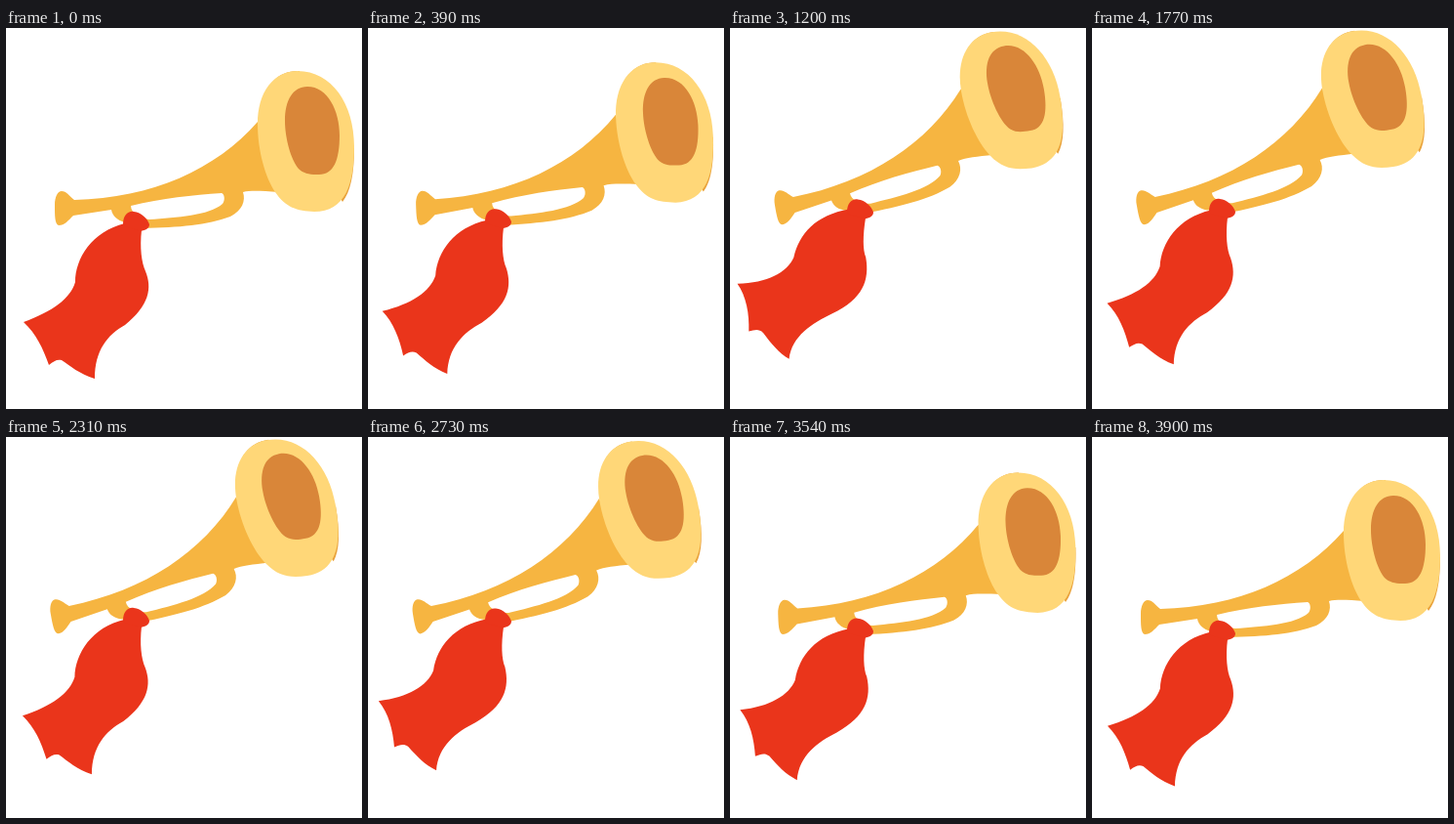
Animation, 365 px wide and 390 px high, one loop 3930 ms. Source, as an HTML page:

```html
<!DOCTYPE html>
<html lang="en">
<head>
<meta charset="utf-8">
<title>Bugle</title>
<style>
  html, body { margin: 0; width: 100%; height: 100%; overflow: hidden; background: #fff; }
  svg { display: block; width: 100vw; height: 100vh; }
</style>
</head>
<body>
<svg viewBox="0 0 365 390">
  <g id="horn">
    <path fill="#f6b541" fill-rule="evenodd" d="
      M50 181C50 173 53 167 57 167C62 167 65 172 70 176
      C150 174 215 145 258 96L266 130L280 168C262 167 252 166 243 168
      C246 177 242 187 230 193C206 202 178 204 140 205
      L122 199C114 197 109 192 108 186L69 192
      C64 197 60 202 54 202C50 201 50 192 50 181Z
      M128 182C160 174 192 171 221 169C224 170 225 176 222 180
      C208 192 175 194 147 196C138 195 128 190 128 182Z"/>
    <path fill="#e9a23b" d="M262 80C267 58 279 43 301 44L300 70Z
      M357 122C357 150 353 168 345 178L330 150Z"/>
    <path fill="#ffd778" d="M258 98C258 66 274 44 299 44C334 44 357 78 357 121
      C357 160 348 188 316 188C298 187 287 184 276 168C266 153 258 126 258 98Z"/>
    <path fill="#d98639" d="M309 60C330 60 342 85 342 110C342 135 336 150 321 150
      C313 150 307 150 301 145C292 136 286 112 286 95C286 74 294 60 309 60Z"/>
  </g>
  <g id="banner" fill="#ea351b">
    <path id="cloth"/>
    <path d="M120 201C120 192 125 187 131 188C139 189 145 195 147 201C147 205 143 207 138 208L122 203Z"/>
  </g>
</svg>
<script>
const LOOP = 3930;
const RISE = 1365;        // time the horn takes to lift or lower
const SWAY = 2100;        // period of the cloth
const LIFT_ANGLE = -10;
const PIVOT = "50 205";

// The two extremes of the swaying cloth, with matching points.
const HANGING = `M139 207C137 225 139 240 143 249C150 266 147 284 122 304
  C104 314 91 330 91 359C75 354 66 346 57 340C52 339 49 341 44 345
  C38 328 31 313 18 301C48 290 66 277 71 260C71 236 88 208 122 200Z`;
const SWUNG = `M139 207C136 225 136 240 139 247C143 271 136 290 104 305
  C83 315 62 328 59 351C48 344 42 336 33 324C28 319 24 321 18 322
  C19 304 16 286 7 273C38 273 58 262 65 247C71 222 88 204 122 198Z`;
const swungValues = SWUNG.match(/\d+/g).map(Number);

const horn = document.getElementById("horn");
const banner = document.getElementById("banner");
const cloth = document.getElementById("cloth");

const wave = turns => (1 - Math.cos(turns * 2 * Math.PI)) / 2;

function clothPath(amount) {
  let i = 0;
  return HANGING.replace(/\d+/g, n => (+n + (swungValues[i++] - n) * amount).toFixed(2));
}

function draw(time) {
  const t = time % LOOP;
  const progress = Math.min(1, (1965 - Math.abs(t - 1950)) / RISE);
  const lift = wave(Math.max(0, progress) / 2);
  horn.setAttribute("transform", `rotate(${LIFT_ANGLE * lift} ${PIVOT})`);
  banner.setAttribute("transform", `translate(0 ${-13 * lift})`);
  cloth.setAttribute("d", clothPath(wave(t / SWAY)));
}

let start;
function tick(now) {
  start ??= now;
  draw(now - start);
  requestAnimationFrame(tick);
}
draw(0);
requestAnimationFrame(tick);
</script>
</body>
</html>
```
